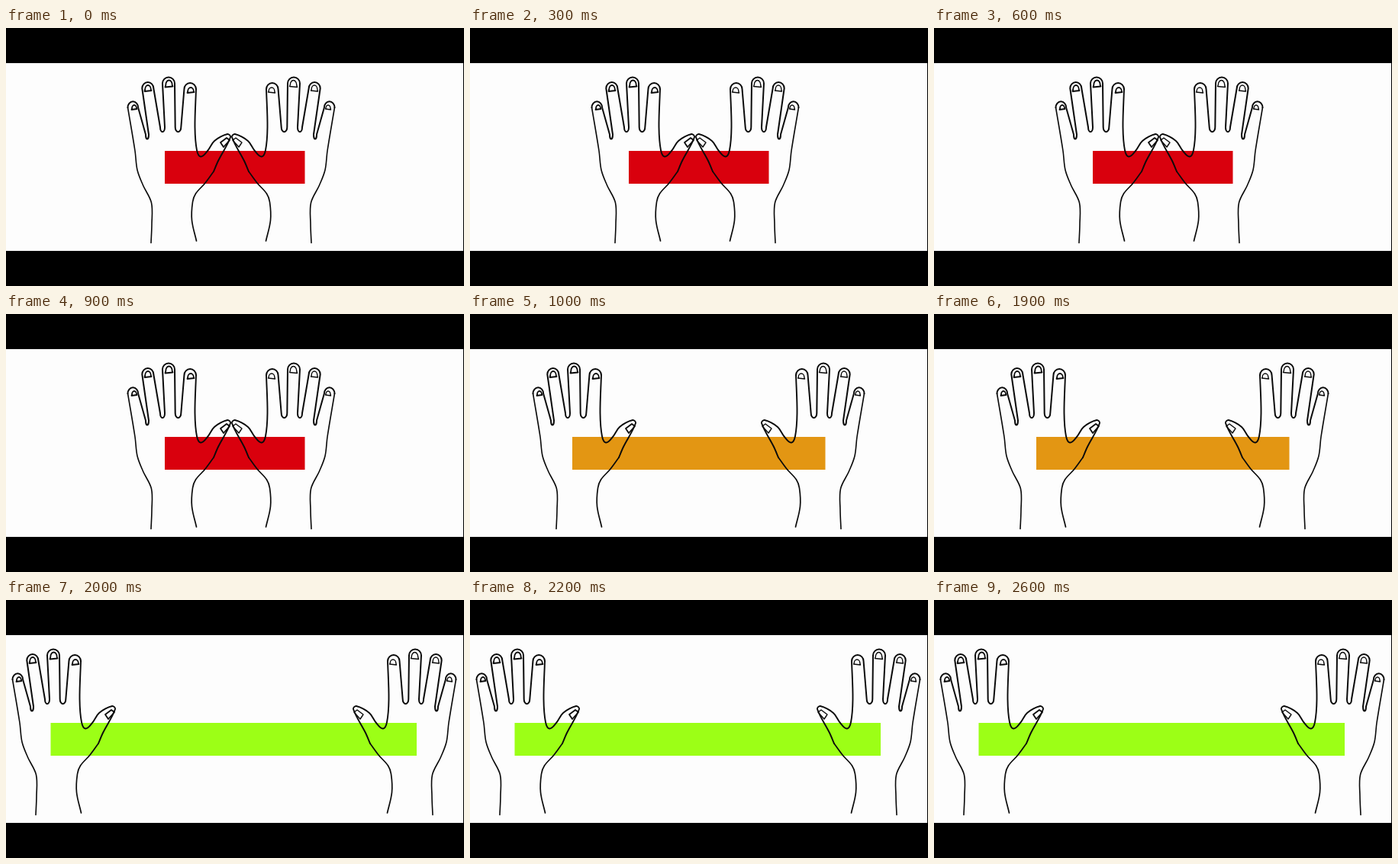
These frames come from a looping animation (600 px wide and 338 px high, 3 s). An HTML page with a canvas:

```html
<!DOCTYPE html>
<html lang="en">
<head>
<meta charset="utf-8">
<title>Hands and bar</title>
<style>
  html, body { margin: 0; width: 100%; height: 100%; overflow: hidden; background: #000; }
  canvas { display: block; }
</style>
</head>
<body>
<canvas id="stage" width="600" height="338"></canvas>
<script>
const ctx = document.getElementById('stage').getContext('2d');
const STEP = 1000;
const MIRROR = 590;
const CAP = 8;

const poses = [
  { color: '#d9000d', from: 208, to: 391.5, left: 0, right: 0 },
  { color: '#e39613', from: 134, to: 465.5, left: -77, right: 86 },
  { color: '#9cff16', from: 58.5, to: 538, left: -151, right: 159 }
];

// Fingers of the left hand, each with its nail and the gap that follows it.
const fingers = [
  { x: 166.3, top: 96.3, width: 13.6, nail: { x: 168, y: 107, width: 7, height: 6 }, gap: { x: 185, y: 145.5, r: 2 } },
  { x: 185.8, top: 71, width: 15, nail: { x: 186, y: 83, width: 9, height: 8 }, gap: { x: 205, y: 136, r: 3 } },
  { x: 213, top: 64.5, width: 16, nail: { x: 213.5, y: 77.5, width: 10, height: 9 }, gap: { x: 225.5, y: 136, r: 3.8 } },
  { x: 241.2, top: 72, width: 15.5, nail: { x: 242, y: 85, width: 9, height: 7 } }
];

const points = text => text.split(' ').map(p => p.split(',').map(Number));
const outerArm = points('190,281.5 191,257 190.5,229 179.5,206 172,186 169,161 159.5,104');
const thumb = points('249,80 247.5,130 250,160 255,168.5 264,161 273,148 290,139 294,143 278,174 272,188');
const innerArm = points('272,188 261,203 248.5,217 244.5,228 243.5,252 249.5,279');
const thumbNail = points('281,150 285,156 293,147 289,144');

// Smooth curve whose handles scale with each segment, so short bends do not overshoot.
function curve(path, width) {
  const handle = (i, length) => {
    const a = path[Math.max(i - 1, 0)], b = path[Math.min(i + 1, path.length - 1)];
    const scale = length / 3 / Math.hypot(b[0] - a[0], b[1] - a[1]);
    return [(b[0] - a[0]) * scale, (b[1] - a[1]) * scale];
  };
  ctx.beginPath();
  ctx.moveTo(...path[0]);
  for (let i = 1; i < path.length; i++) {
    const p = path[i - 1], q = path[i];
    const length = Math.hypot(q[0] - p[0], q[1] - p[1]);
    const u = handle(i - 1, length), v = handle(i, length);
    ctx.bezierCurveTo(p[0] + u[0], p[1] + u[1], q[0] - v[0], q[1] - v[1], ...q);
  }
  ctx.lineWidth = width;
  ctx.stroke();
}

function drawFingers() {
  ctx.beginPath();
  for (const { x, top, width, gap } of fingers) {
    ctx.ellipse(x, top + CAP, width / 2, CAP, 0, Math.PI, 2 * Math.PI);
    if (gap) ctx.ellipse(gap.x, gap.y - 6, gap.r, 6, 0, Math.PI, 0, true);
  }
  ctx.lineWidth = 2;
  ctx.stroke();
}

function drawNails(width) {
  ctx.lineWidth = width;
  for (const { nail } of fingers) {
    const rx = nail.width / 2, ry = nail.height * 0.7;
    ctx.beginPath();
    ctx.moveTo(nail.x - rx, nail.y);
    ctx.ellipse(nail.x, nail.y - nail.height + ry, rx * 0.85, ry, 0, Math.PI, 2 * Math.PI);
    ctx.lineTo(nail.x + rx, nail.y - 1);
    ctx.closePath();
    ctx.stroke();
  }
  ctx.beginPath();
  for (const p of thumbNail) ctx.lineTo(...p);
  ctx.closePath();
  ctx.stroke();
}

function drawHand(shift, mirrored) {
  ctx.save();
  ctx.translate(shift, 0);
  if (mirrored) {
    ctx.translate(MIRROR, 0);
    ctx.scale(-1, 1);
  }
  curve(outerArm, 1.6);
  drawFingers();
  curve(thumb, 1.9);
  curve(innerArm, 1.7);
  drawNails(mirrored ? 1.4 : 1.8);
  ctx.restore();
}

function draw(time) {
  const pose = poses[Math.floor(time / STEP) % poses.length];
  ctx.fillStyle = '#000';
  ctx.fillRect(0, 0, 600, 338);
  ctx.fillStyle = '#fdfdfd';
  ctx.fillRect(0, 46, 599, 246);
  ctx.fillStyle = pose.color;
  ctx.fillRect(pose.from, 161, pose.to - pose.from, 43);
  ctx.strokeStyle = '#0a0a0a';
  ctx.lineCap = ctx.lineJoin = 'round';
  drawHand(pose.left, false);
  drawHand(pose.right, true);
}

const start = performance.now();
function tick() {
  draw(performance.now() - start);
  requestAnimationFrame(tick);
}
tick();
</script>
</body>
</html>
```
